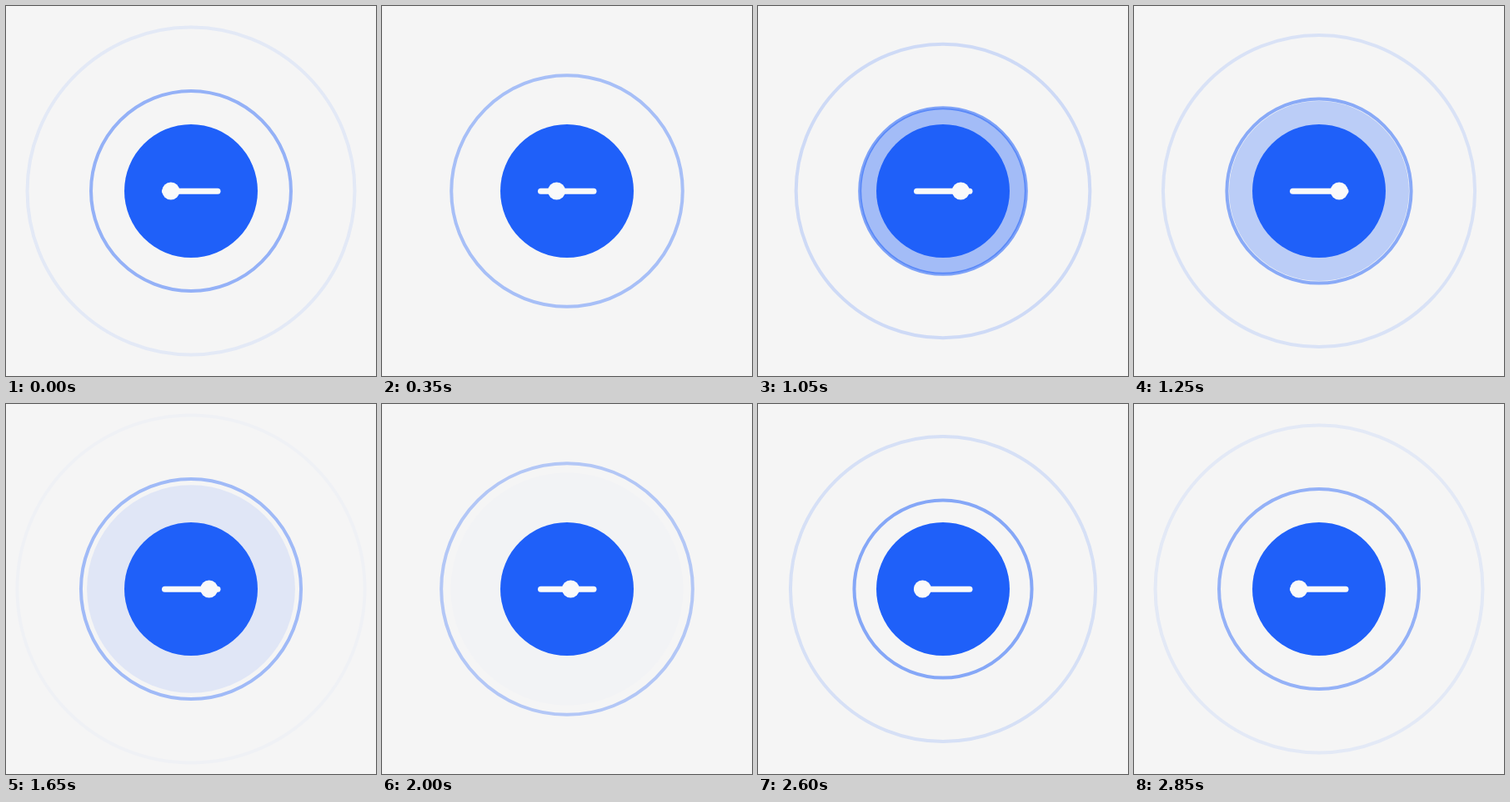
Write an HTML page that moves like this. It is 444x444 px and loops after 2.9 s.

```html
<!DOCTYPE html>
<html lang="en">
<head>
<meta charset="utf-8">
<title>Slider pulse</title>
<style>
  html, body { margin: 0; width: 100%; height: 100%; overflow: hidden; background: #f5f5f5; }
  svg { display: block; width: 100vw; height: 100vh; }
  .blue { fill: #1f60f9; }
  .ring { fill: none; stroke: #1f60f9; stroke-width: 4; }
  .track { stroke: #fafafa; stroke-width: 7; stroke-linecap: round; }
  .knob { fill: #fafafa; }
</style>
</head>
<body>
<svg viewBox="0 0 444 444">
  <circle id="glow" class="blue" cx="222" cy="222"/>
  <circle class="ring" cx="222" cy="222"/>
  <circle class="ring" cx="222" cy="222"/>
  <circle class="blue" cx="222" cy="222" r="80"/>
  <path class="track" d="M190.5 222.3H254"/>
  <circle id="knob" class="knob" cy="222" r="10.5"/>
</svg>
<script>
  const LOOP = 2900, CYCLE = 2850, STEP = 50;
  const glow = document.getElementById('glow');
  const knob = document.getElementById('knob');
  const rings = [...document.querySelectorAll('.ring')];

  const clamp = x => Math.min(1, Math.max(0, x));
  const ease = (t, from, to) => (1 - Math.cos(Math.PI * clamp((t - from) / (to - from)))) / 2;

  function set(el, attrs) {
    for (const key in attrs) el.setAttribute(key, attrs[key]);
  }

  function draw(t) {
    // Two rings, half a cycle apart, grow and fade steadily.
    rings.forEach((ring, i) => {
      const p = (t / CYCLE + 0.392 + i / 2) % 1;
      set(ring, { r: 60 + 153 * p, 'stroke-opacity': 0.75 * (1 - p) });
    });

    // One soft disc per cycle spreads out from behind the button.
    const on = t > 560 && t < 2140;
    const fade = on ? 0.27 * Math.pow((2140 - t) / 890, 1.7) : 0;
    set(glow, { r: on ? 89 + 0.0422 * (t - 800) : 0, 'fill-opacity': Math.min(0.6, fade) });

    // The knob goes right, rests, returns and rests again.
    const pos = ease(t, -115, 1265) - ease(t, 1479, 2670) + ease(t, CYCLE - 115, CYCLE + 1265);
    set(knob, { cx: 197 + 49.2 * pos });
  }

  const start = performance.now();
  function tick() {
    const t = (performance.now() - start) % LOOP;
    draw(Math.floor(t / STEP) * STEP);
    requestAnimationFrame(tick);
  }
  tick();
</script>
</body>
</html>
```
